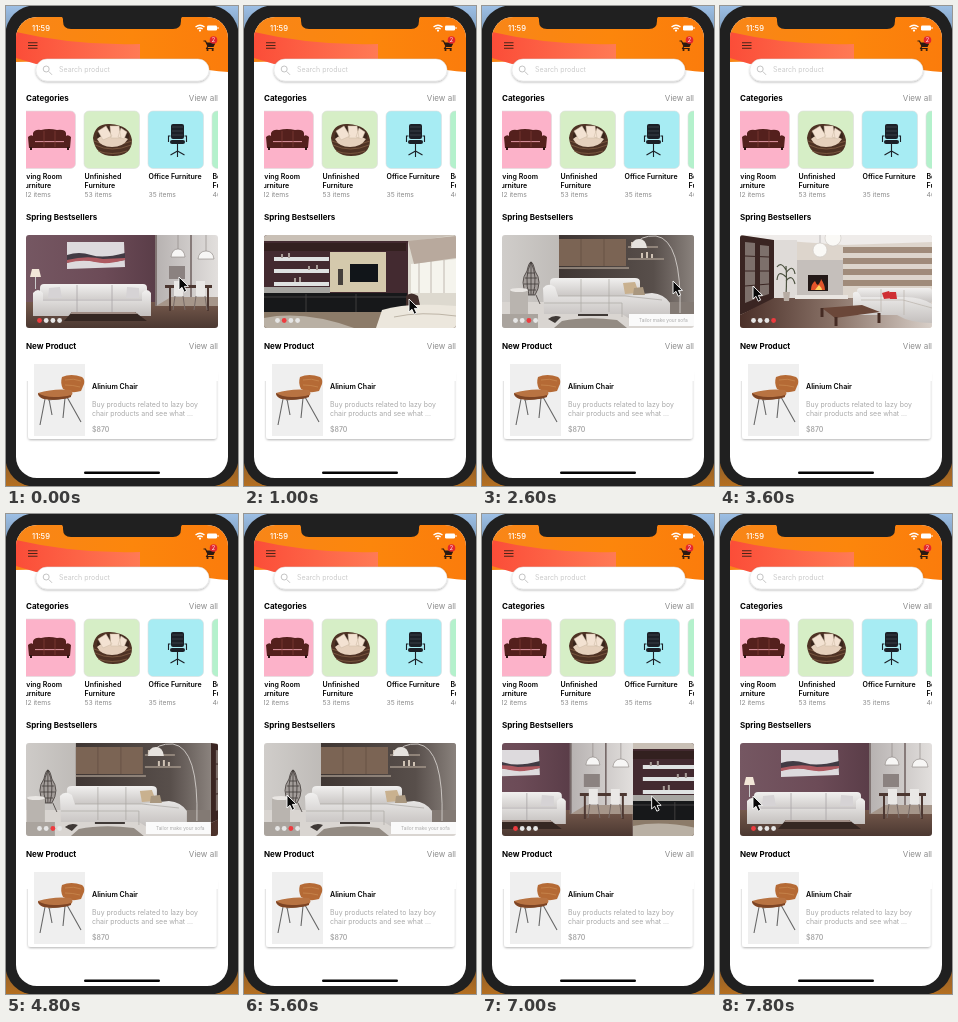
Animation, 232 px wide and 480 px high, one loop 8000 ms. Source, as an HTML page:

```html
<!DOCTYPE html>
<html lang="en">
<head>
<meta charset="utf-8">
<title>Furniture shop</title>
<style>
  html, body { margin: 0; width: 100%; height: 100%; overflow: hidden; }
  svg { display: block; width: 100%; height: 100%; }
  text { font-family: Inter, "Open Sans", sans-serif; font-size: 7px; }
  .h { font-size: 8px; font-weight: 700; }
  .b { font-weight: 600; }
  .g { fill: #8c8c8c; }
  .s { font-size: 6.95px; fill: #a9a9a9; }
</style>
</head>
<body>
<svg viewBox="0 0 232 480">
  <defs>
    <linearGradient id="desk" x2="0" y2="1"><stop stop-color="#9dbfe4"/><stop offset=".12" stop-color="#55728f"/><stop offset=".88" stop-color="#5c4a38"/><stop offset="1" stop-color="#b56f20"/></linearGradient>
    <linearGradient id="orange"><stop stop-color="#f88618"/><stop offset=".55" stop-color="#fc860c"/><stop offset="1" stop-color="#fb7c0c"/></linearGradient>
    <linearGradient id="coral"><stop stop-color="#fb4d38"/><stop offset="1" stop-color="#ff7a55"/></linearGradient>
    <linearGradient id="mauve"><stop stop-color="#755762"/><stop offset=".6" stop-color="#6c4b57"/><stop offset="1" stop-color="#5a3d48"/></linearGradient>
    <linearGradient id="pale"><stop stop-color="#b6b1b0"/><stop offset="1" stop-color="#e2dfdd"/></linearGradient>
    <linearGradient id="wood" x2="0" y2="1"><stop stop-color="#75594c"/><stop offset="1" stop-color="#4b3831"/></linearGradient>
    <linearGradient id="grey"><stop stop-color="#d0cdca"/><stop offset="1" stop-color="#96918d"/></linearGradient>
    <linearGradient id="dark"><stop stop-color="#3f3633"/><stop offset=".7" stop-color="#584f4b"/><stop offset="1" stop-color="#8a827d"/></linearGradient>
    <linearGradient id="gloss"><stop stop-color="#4a2f28"/><stop offset=".5" stop-color="#8b7469"/><stop offset="1" stop-color="#d8cfc8"/></linearGradient>
    <linearGradient id="couch" x2="0" y2="1"><stop stop-color="#f1f0ef"/><stop offset="1" stop-color="#c4c0be"/></linearGradient>
    <filter id="shade" x="-10%" y="-20%" width="120%" height="150%"><feDropShadow dx="0" dy="1" stdDeviation="1" flood-opacity=".3"/></filter>
    <clipPath id="screen"><rect x="10" y="11" width="212" height="461" rx="21"/></clipPath>
    <clipPath id="row"><rect x="20" y="100" width="192" height="96"/></clipPath>
    <clipPath id="view"><rect x="20" y="229" width="192" height="93" rx="3"/></clipPath>
    <clipPath id="pane"><rect width="192.3" height="93"/></clipPath>
  </defs>

  <rect width="232" height="480" fill="url(#desk)"/>
  <rect x="-.5" y="-.5" width="233" height="481" rx="29" fill="#202020"/>

  <g clip-path="url(#screen)">
    <rect x="10" y="11" width="212" height="461" fill="#fff"/>
    <path d="M10 11H222V66Q185 63 134 53L10 56Z" fill="url(#orange)"/>
    <path d="M10 26Q70 40 134 38V54Q90 50 30 58L10 52Z" fill="url(#coral)"/>
    <path d="M54 10.500q3 0 3 3v1.500q0 8 8 8H167q8 0 8-8v-1.500q0-3 3-3Z" fill="#202020"/>
  </g>

  <!-- status bar and header -->
  <text x="26" y="25" fill="#fff" font-weight="500" style="font-size:7.6px">11:59</text>
  <g fill="none" stroke="#fff" stroke-width="1.300">
    <path d="M189.500 21q4.500-3.500 9 0M191.300 23q2.700-2 5.400 0"/>
    <circle cx="194" cy="24.600" r=".5"/>
  </g>
  <rect x="201" y="19.500" width="10" height="5" rx="1.300" fill="#fff"/>
  <path d="M212 21v2" stroke="#fff"/>
  <path d="M22 36.800h9.500M22 39.500h9.500M22 42.200h9.500" stroke="#4a2418" stroke-width="1.100"/>
  <g fill="none" stroke="#2b1a12" stroke-width="1.200">
    <path d="M197.500 35h2l2.600 5.500h5l1.500-3M201.700 40.500l-1 2h7"/>
    <path d="M201 37h7l-1.200 3h-4.500Z" fill="#2b1a12"/>
    <circle cx="201.500" cy="44" r=".5"/><circle cx="206.700" cy="44" r=".5"/>
  </g>
  <circle cx="207.500" cy="34" r="3.800" fill="#e3262d"/>
  <text x="207.500" y="36" text-anchor="middle" fill="#fff" style="font-size:5.500px">2</text>

  <rect x="30" y="53" width="173" height="22" rx="11" fill="#fff" stroke="#e2e2e2" stroke-width=".5" filter="url(#shade)"/>
  <path d="M42.800 65.500l3.200 3.300M43.200 63a3 3 0 1 0-6 0a3 3 0 1 0 6 0" fill="none" stroke="#c4c4c4"/>
  <text x="53" y="66.300" fill="#cbcbcb">Search product</text>

  <text class="h" x="20" y="95">Categories</text>
  <text class="h" x="20" y="214">Spring Bestsellers</text>
  <text class="h" x="20" y="343">New Product</text>
  <g class="g" text-anchor="end">
    <text x="212" y="95" style="font-size:8px">View all</text>
    <text x="212" y="343" style="font-size:8px">View all</text>
  </g>

  <!-- categories -->
  <g clip-path="url(#row)">
    <g id="cards"></g>
    <g fill="#54201d">
      <path d="M27 127q2-4 8-3 8-2 16 0 8-1 9 3v8H27Z"/>
      <path d="M22 131q4-4 7 1v4h29v-4q3-5 7-1l-1 11H23Z"/>
      <path d="M29 136h29M38 125v16M49 125v16" stroke="#86403a" stroke-width=".7" fill="none"/>
      <path d="M25 141v3M62 141v3" stroke="#2f1513" stroke-width="2"/>
    </g>
    <path d="M87 132q2-15 17-14 20 1 22 16 0 16-19 16-18 0-20-18" fill="#4e3224"/>
    <path d="M89 139q17 8 36 0M88 135q18 8 38 0M92 145q14 5 29 0" fill="none" stroke="#8a6549" stroke-width=".7"/>
    <ellipse cx="107" cy="130" rx="16" ry="10" fill="#39251c"/>
    <path d="M91 133q6-5 16-4t15 4q-5 8-16 8-11 0-15-8" fill="#e5d0bc"/>
    <path d="M92 125l8-5 6 10-9 4ZM104 120l9 0 2 12-10 0ZM115 122l6 4-3 7-6-2Z" fill="#f3e2d2" stroke="#cbb8a2" stroke-width=".5"/>
    <g fill="#1b2027">
      <rect x="165" y="118" width="13" height="15" rx="2"/>
      <rect x="164" y="134" width="15" height="4" rx="2"/>
      <path d="M166 121h11M166 125h11M166 129h11" stroke="#4b535b" stroke-width=".6"/>
      <path d="M162.500 136v-6h2M180.500 136v-6h-2M171.500 138v8M171.500 145l-7 4M171.500 145l7 4M171.500 145v6" fill="none" stroke="#1b2027" stroke-width="1.100"/>
    </g>
  </g>

  <!-- carousel -->
  <g clip-path="url(#view)">
    <g id="strip">
      <g class="slide">
        <rect width="130" height="75" fill="url(#mauve)"/>
        <rect y="67" width="192" height="26" fill="url(#wood)"/>
        <path d="M41 7l57 0 1 25-58 2Z" fill="#dddadd"/>
        <path d="M41 20q12-4 24 0t34-2v7q-18 4-33 1t-25 2Z" fill="#423b44"/>
        <path d="M41 25q20-5 36-1l22-1v2q-18 5-30 2t-28 1Z" fill="#ad5960"/>
        <rect x="129" width="63" height="71" fill="url(#pale)"/>
        <path d="M130 0v71M165 0v62" stroke="#6f605f" stroke-width="1.500"/>
        <path d="M130 71l15-9h47v9Z" fill="#a6968a"/>
        <rect x="143" y="31" width="16" height="13" fill="#8b8280"/>
        <g fill="#f7f6f5" stroke="#89817e" stroke-width=".6">
          <path d="M152 0v14M180 0v16"/>
          <path d="M145 22q1-8 7-8t7 8ZM172 24q1-8 8-8t8 8Z"/>
        </g>
        <path d="M139 50h47v3h-47Zm4 3h2v23h-2Zm38 0h2v23h-2Z" fill="#4c3731"/>
        <path d="M148 46h9v15h-9Zm22 0h9v15h-9Z" fill="#eae8e6"/>
        <path d="M149 61l-2 14M157 61l2 14M170 61l-2 14M179 61l2 14" stroke="#776a66"/>
        <path d="M4 42l2-8h7l2 8Z" fill="#f2e6d8"/><path d="M9.500 42v12" stroke="#ccc"/>
        <rect x="14" y="49" width="107" height="22" rx="4" fill="url(#couch)"/>
        <path d="M7 58q5-6 10 0v6h99v-6q5-6 9 0v23H7Z" fill="url(#couch)"/>
        <path d="M17 65h99M51 50v27M86 50v27" fill="none" stroke="#a9a4a6" stroke-width=".8"/>
        <path d="M23 53l11-1 2 11H22ZM101 52l12 1v10h-13Z" fill="#d6d3d5"/>
        <path d="M46 77h63l12 9H38Z" fill="#352722"/><path d="M46 77h63l3 2H44Z" fill="#9f8c84"/>
      </g>

      <g class="slide">
        <rect width="192" height="93" fill="#432a30"/>
        <path d="M0 0H192V9L145 6H0Z" fill="#c9c0b6"/>
        <path d="M0 8H142V16H0Z" fill="#33201f"/>
        <rect x="66" y="17" width="56" height="40" fill="#d4c9ac"/>
        <rect x="86" y="29" width="28" height="18" fill="#111519"/>
        <rect x="74" y="34" width="5" height="16" fill="#45403b"/>
        <path d="M10 24h55M10 36h55M10 49h55" stroke="#dfe2e2" stroke-width="4"/>
        <path d="M18 19v4M25 18v5M45 31v4M53 30v5M31 43v4M36 42v5" stroke="#a99d98" stroke-width="2"/>
        <path d="M0 52H66v8H0Z" fill="#a6a5a1"/>
        <rect y="58" width="143" height="20" fill="#17181a"/>
        <path d="M0 62h143M42 59v19M92 59v19" stroke="#4b4848" stroke-width=".8"/>
        <path d="M144 7L192 0V72H144Z" fill="#ddd9cf"/>
        <path d="M147 29L192 24V58H147Z" fill="#f5f4ed"/>
        <path d="M144 6L192 1V23L150 29Z" fill="#b8a99d"/>
        <path d="M155 27v31M167 26v32M180 25v33" stroke="#b3aaa1" stroke-width=".8"/>
        <path d="M0 77H192V93H0Z" fill="#8c7b69"/>
        <path d="M142 61q5-5 12 0l2 9h10v9h-24Z" fill="#422e2b"/>
        <path d="M118 75q25-8 74-4v22H112Z" fill="#ece7dd"/>
        <path d="M130 82q27-6 62-1" fill="none" stroke="#bdb4a6"/>
        <path d="M0 83q40-8 90 10H0Z" fill="#b9b0a4"/>
      </g>

      <g class="slide">
        <rect width="192" height="72" fill="url(#grey)"/>
        <rect x="57" width="135" height="70" fill="url(#dark)"/>
        <rect y="67" width="192" height="26" fill="#d9d5d1"/>
        <path d="M150 67h42v14h-50Z" fill="#837a74"/>
        <path d="M57 4h67v27H57Z" fill="#7b6454"/>
        <path d="M79 4v27M102 4v27" stroke="#614d41" stroke-width=".7"/>
        <path d="M57 33h70M126 12h30M126 24h36" stroke="#a39589" stroke-width="1.500"/>
        <path d="M130 7v4M134 6v5M140 18v5M145 17v6M150 19v4" stroke="#cfc2b4" stroke-width="2"/>
        <g fill="none" stroke="#403a38" stroke-width=".8">
          <path d="M25 60q-8-13 0-24 2-9 4-9t4 9q8 11 0 24Z" fill="#6b635f" fill-opacity=".4"/>
          <path d="M27 60q-5-18 2-33 7 15 2 33M29 27v33M23 43h12M22 49h14M24 55h10M25 38h8M24 60l-4 9M34 60l4 9"/>
        </g>
        <path d="M132 11Q138 0 154 1Q180 5 178 78" fill="none" stroke="#c9c4c0"/>
        <path d="M129 13q1-9 8-9t8 9Z" fill="#e6e2de"/>
        <path d="M48 47q0-4 5-4h80q5 0 5 4v17H48Z" fill="url(#couch)"/>
        <path d="M41 53q5-6 12-1l3 9h66l28-3q12 1 18 10v13l-40 3-8-5H42Z" fill="url(#couch)"/>
        <path d="M56 61h67l37 4M79 44v33M107 44v33M120 68v14M42 68h78" fill="none" stroke="#aaa6a2" stroke-width=".7"/>
        <path d="M121 48l12-1 4 11-14 1Z" fill="#c9b18f"/><path d="M132 53l9-1 2 8h-12Z" fill="#a9977f"/>
        <path d="M8 55h18v25H8Z" fill="#b9b4af"/><ellipse cx="17" cy="55" rx="9" ry="2" fill="#e9e6e3"/>
        <path d="M0 79h36v14H0Z" fill="#aaa49e"/>
        <path d="M60 86q24-5 55-1l10 8H52Z" fill="#938b83"/>
        <path d="M46 84q6-5 13-2l-6 6ZM76 79h30v2H76Z" fill="#3f3936"/>
        <rect x="127" y="79" width="65" height="12" fill="#fafafa"/>
        <text x="137" y="87" style="font-size:4.800px" fill="#aaa">Tailor make your sofa</text>
      </g>

      <g class="slide">
        <rect width="192" height="93" fill="#ddd5cc"/>
        <path d="M0 0H192V7L104 10 32 5Z" fill="#efecea"/>
        <g id="bands"></g>
        <path d="M0 0L34 5V65L0 80Z" fill="#3a2522"/>
        <path d="M5 7l10 1v56l-10 4ZM20 10l9 1v48l-9 3Z" fill="#7d706b"/>
        <path d="M5 21l24 1M5 36h24M5 51l24-2" stroke="#3a2522"/>
        <path d="M34 5h23v60H34Z" fill="#dfdbd8"/>
        <path d="M0 80L34 63H192V93H0Z" fill="url(#gloss)"/>
        <path d="M57 25h46v37H57Z" fill="#c5bfbb"/>
        <rect x="68" y="40" width="20" height="16" fill="#231917"/>
        <path d="M71 55q0-6 4-9 1 3 3 4 3-4 3-6 4 6 4 11Z" fill="#e2542a"/>
        <path d="M75 55q2-3 4-5 3 3 3 5Z" fill="#ffd35f"/>
        <path d="M55 62h53" stroke="#e9e5e1" stroke-width="4"/>
        <path d="M46 61Q47 43 46 31M46 42q-8-8-9 3M46 38q7-10 9 1M46 35q-5-9-9-3M46 46q6-8 9 3" fill="none" stroke="#4c5240" stroke-width="1.200"/>
        <path d="M43 57h7l-1 9h-5Z" fill="#b7aca3"/>
        <path d="M80 0v8M92 0v2" stroke="#888" stroke-width=".5"/>
        <g fill="#faf9f6" stroke="#ccc7c2" stroke-width=".6"><circle cx="80" cy="15" r="7"/><circle cx="93" cy="3" r="8"/></g>
        <rect x="117" y="53" width="75" height="15" rx="3" fill="url(#couch)"/>
        <path d="M113 58q5-4 8 4h44q16 0 27 7v19q-22 0-35-8h-44Z" fill="url(#couch)"/>
        <path d="M121 65h42l29 8M141 54v23M164 55v25" fill="none" stroke="#b9b2aa" stroke-width=".7"/>
        <path d="M142 58l7-2 4 7-9 1ZM150 57l6 0 1 7h-7Z" fill="#cf2f33"/>
        <path d="M82 73l40-3 18 7-45 6Z" fill="#6b4739"/>
        <path d="M82 73v9M96 82v9M139 78v10" stroke="#452b23" stroke-width="3"/>
      </g>
    </g>
    <g id="dots"></g>
  </g>

  <!-- new product -->
  <rect x="22" y="365" width="188.500" height="68" rx="3" fill="#fff" filter="url(#shade)"/>
  <rect x="20" y="359" width="192" height="16" fill="#fff"/>
  <rect x="28" y="358" width="51" height="72" fill="#efefef"/>
  <g fill="none" stroke="#676767" stroke-width="1.100">
    <path d="M39 393l-5 26M43 393l3 16M61 391l14 25M59 392l-2 20M42 394l18-2 7-10"/>
  </g>
  <path d="M56 371q9-4 20 0 3 2 2 7l-3 7q-10 3-18-2-3-6-1-12Z" fill="#b56a35"/>
  <path d="M59 374q9-2 16 1M59 379q8 0 15 2" fill="none" stroke="#cb8c52" stroke-width=".7"/>
  <path d="M32 387q16-5 33-3 3 3 0 6-11 5-27 3-6-2-6-6Z" fill="#b87342"/>
  <path d="M32 387q6 4 16 4t17-2v2q-11 4-27 2-6-2-6-6Z" fill="#7d4424"/>
  <text class="b" x="86" y="383" style="font-size:7.100px">Alinium Chair</text>
  <text class="s" x="86" y="400.500">Buy products related to lazy boy</text>
  <text class="s" x="86" y="409.500">chair products and see what ...</text>
  <text class="s b" x="86" y="425.500">$870</text>

  <rect x="78" y="465.500" width="76" height="2.500" rx="1.250" fill="#050505"/>
  <path id="cursor" d="M0 0V13L3 10.300 5.200 15.200 7.600 14.100 5.400 9.400H9.500Z" fill="#080808" stroke="#fff" stroke-width=".9"/>
</svg>

<script>
const LOOP = 8000, TICK = 200, WIDTH = 192;
const $ = id => document.getElementById(id);

const cards = [
  ["#fcb2c9", "Living Room", "Furniture", "212 items"],
  ["#d6eec6", "Unfinished", "Furniture", "53 items"],
  ["#a7ecf3", "Office Furniture", "", "35 items"],
  ["#b4f1cc", "Bedroom", "Furniture", "46 items"]
];
$("cards").innerHTML = cards.map(([color, top, bottom, count], i) => {
  const x = 14 + i * 64;
  return `<rect x="${x}" y="105" width="55.500" height="57.500" rx="5" fill="${color}" stroke="#ddd" stroke-width=".6"/>
    <text class="b" x="${x + .5}" y="173">${top}</text>
    <text class="b" x="${x + .5}" y="182">${bottom}</text>
    <text class="g" style="font-size:6.800px" x="${x + .5}" y="191">${count}</text>`;
}).join("");

$("bands").innerHTML = Array.from({ length: 4 }, (_, i) =>
  `<rect x="103" y="${12 + i * 11}" width="89" height="6" fill="#a08b7a"/>`).join("");

document.querySelectorAll(".slide").forEach((slide, i) => {
  slide.setAttribute("transform", `translate(${i * WIDTH})`);
  slide.setAttribute("clip-path", "url(#pane)");
});

$("dots").innerHTML = Array.from({ length: 4 }, (_, i) =>
  `<circle cx="${33.500 + i * 6.700}" cy="314.500" r="2.400"/>`).join("");
const dots = [...$("dots").children];

// [time, slide position]
const swipe = [
  [0, 0], [200, 0], [600, .85], [800, 1], [1400, 1], [2000, 1.92], [2200, 2],
  [2600, 2], [3200, 2.95], [3400, 3], [3800, 3], [4600, 2.1], [4800, 2.037],
  [5000, 2], [5600, 2], [6200, 1.115], [6400, 1], [6600, 1], [7200, .08], [7400, 0], [8000, 0]
];
// [time, x, y]
const pointer = [
  [0, 173, 271], [200, 170, 274], [600, 45, 284], [800, 45, 288], [1000, 165, 293],
  [1400, 185, 290], [2000, 40, 283], [2200, 45, 282], [2600, 191, 275], [3200, 33, 280],
  [3800, 33, 280], [4600, 240, 282], [5000, 240, 282], [5400, 43, 281], [5600, 43, 281],
  [6200, 213, 280], [6400, 214, 280], [6600, 40, 282], [7200, 215, 282], [7400, 215, 282],
  [7800, 33, 282], [8000, 33, 282]
];

function sample(keys, t) {
  const i = keys.findIndex(k => k[0] > t);
  const [a, b] = [keys[i - 1], keys[i]];
  const u = (t - a[0]) / (b[0] - a[0]);
  const ease = u * u * (3 - 2 * u);
  return a.slice(1).map((v, n) => v + (b[n + 1] - v) * ease);
}

function draw(time) {
  const t = Math.floor((time % LOOP) / TICK) * TICK;
  const [pos] = sample(swipe, t);
  const [x, y] = sample(pointer, t);
  $("strip").setAttribute("transform", `translate(${20 - pos * WIDTH} 229)`);
  $("cursor").setAttribute("transform", `translate(${x} ${y})`);
  dots.forEach((dot, i) => dot.setAttribute("fill", i === Math.round(pos) ? "#ee3b3f" : "#e6e6e6"));
}

const start = performance.now();
function loop() {
  draw(performance.now() - start);
  requestAnimationFrame(loop);
}
loop();
</script>
</body>
</html>
```
